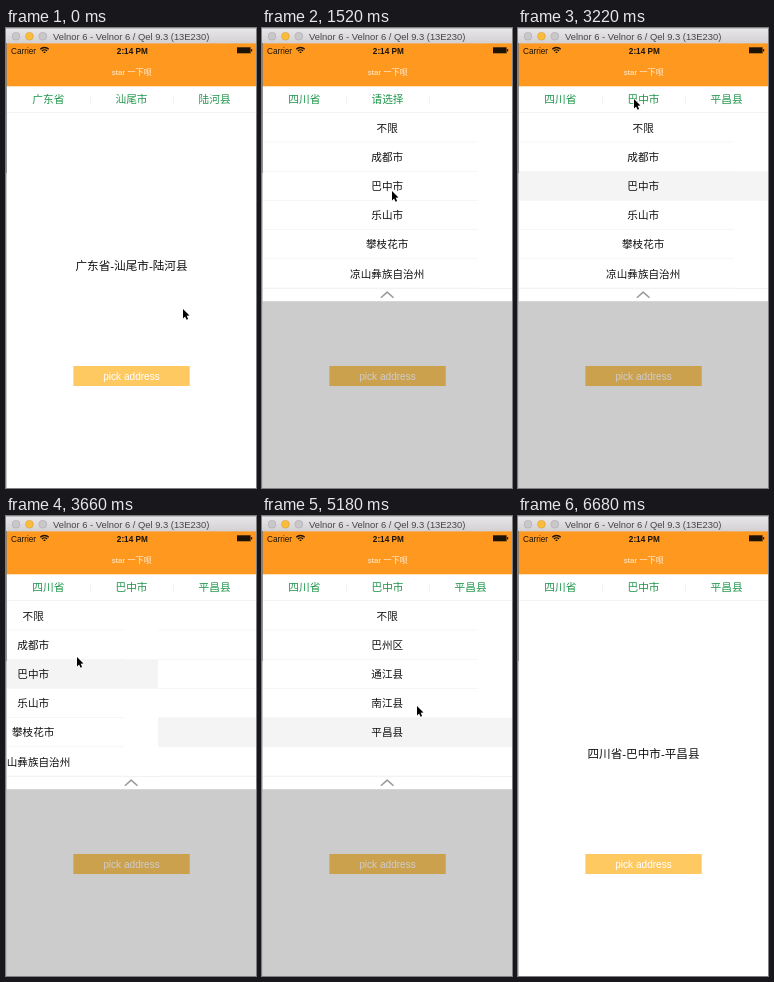
These frames come from a looping animation (250 by 460 pixels, 6.7 s). An HTML page with a canvas:

```html
<!DOCTYPE html>
<html lang="zh-CN">
<head>
<meta charset="utf-8">
<title>Address picker</title>
<style>
html, body { margin: 0; width: 100%; height: 100%; overflow: hidden; background: #fff; }
canvas { display: block; width: 250px; height: 460px; }
</style>
</head>
<body>
<canvas id="stage"></canvas>
<script>
const W = 250, H = 460, LOOP = 6700, MID = 125.2;
const TOP = 85, ROW = 29.2, LIST_H = ROW * 6, BAR_H = 13;
const INK = '#1c1208';
const FONT = '"Liberation Sans", "Noto Sans CJK SC", "Noto Sans CJK", sans-serif';

const canvas = document.getElementById('stage');
const ctx = canvas.getContext('2d');
const dpr = window.devicePixelRatio || 1;
canvas.width = W * dpr;
canvas.height = H * dpr;

const provinces = ['湖南省', '广东省', '广西壮族自治区', '海南省', '重庆市', '四川省', '贵州省', '云南省', '西藏自治区'];
const cities = ['不限', '成都市', '巴中市', '乐山市', '攀枝花市', '凉山彝族自治州'];
const counties = ['不限', '巴州区', '通江县', '南江县', '平昌县'];

// Moments of each action; the lists stand side by side as three pages
const OPEN = 680, PICK_PROVINCE = 1240, PICK_CITY = 1620, PICK_COUNTY = 2060;
const REOPEN = 2735, SWIPE = 3614, SWIPE_BACK = 3960;
const TAP_PROVINCE = 4622, TAP_CITY = 4820, TAP_COUNTY = 5000, CLOSE = 5660;

const tabX = i => 42.4 + i * 83.1;
const tab = i => [tabX(i) + 7, 70];
const row = i => [130, TOP + (i + .6) * ROW];

// The pointer reaches each place at the given time and waits there
const stops = [
  [0, 177, 281], [OPEN - 60, ...tab(0)], [PICK_PROVINCE - 40, ...row(2.5)], [1500, 130, 163],
  [PICK_COUNTY - 60, ...row(4)], [REOPEN - 40, 116, 71], [SWIPE - 20, 166, 141], [SWIPE + 46, 71, 141],
  [SWIPE_BACK + 120, 166, 141], [TAP_PROVINCE - 20, 49, 69], [TAP_CITY - 20, ...tab(1)],
  [TAP_COUNTY - 20, ...tab(2)], [5180, 155, 190], [CLOSE - 60, ...row(4)], [6560, 160, 475]
];

function ramp(t, start, span = 110) {
  const u = Math.min(1, Math.max(0, (t - start) / span));
  return u * u * (3 - 2 * u);
}

const openness = t => ramp(t, OPEN) - ramp(t, PICK_COUNTY) + ramp(t, REOPEN) - ramp(t, CLOSE);

const pageAt = t => ramp(t, PICK_PROVINCE) + ramp(t, PICK_CITY) - (t > 2400 ? 1 : 0)
  + ramp(t, SWIPE) - ramp(t, SWIPE_BACK) - ramp(t, TAP_PROVINCE) + ramp(t, TAP_CITY) + ramp(t, TAP_COUNTY);

function pointerAt(t) {
  const i = stops.findIndex(s => s[0] > t);
  if (i < 0) return stops[stops.length - 1].slice(1);
  const [t0, x0, y0] = stops[i - 1], [t1, x1, y1] = stops[i];
  const span = Math.min(t1 - t0, 360), u = ramp(t, t1 - span, span);
  return [x0 + (x1 - x0) * u, y0 + (y1 - y0) * u];
}

function rect(x, y, w, h, color) {
  ctx.fillStyle = color;
  ctx.fillRect(x, y, w, h);
}

function text(s, x, cy, size, color, align = 'center', weight = 400) {
  ctx.font = `${weight} ${size}px ${FONT}`;
  ctx.textAlign = align;
  ctx.fillStyle = color;
  ctx.fillText(s, x, cy + size * .37);
}

function clipped(x, y, w, h, draw) {
  ctx.save();
  ctx.beginPath();
  ctx.rect(x, y, w, h);
  ctx.clip();
  draw();
  ctx.restore();
}

function titleBar() {
  const g = ctx.createLinearGradient(0, 0, 0, 15);
  g.addColorStop(0, '#e9e7e9');
  g.addColorStop(1, '#d3d1d3');
  rect(0, 0, W, 15.4, g);
  rect(0, 0, W, .7, '#b0b0b0');
  for (let i = 0; i < 3; i++) {
    ctx.beginPath();
    ctx.arc(10 + i * 13.4, 8.2, 4, 0, 7);
    ctx.fillStyle = i === 1 ? '#f8bd3c' : '#c9c7c9';
    ctx.fill();
    ctx.lineWidth = .5;
    ctx.strokeStyle = 'rgba(0,0,0,.18)';
    ctx.stroke();
  }
  text('Velnor 6 - Velnor 6 / Qel 9.3 (13E230)', 47, 8.4, 9.4, '#464646', 'left');
}

function header() {
  rect(0, 15, W, 43.3, '#ff981f');
  text('Carrier', 5, 22.5, 8.2, INK, 'left');
  text('2:14 PM', 126.3, 22.5, 8.2, INK, 'center', 700);
  ctx.strokeStyle = INK;
  ctx.lineWidth = 1.3;
  for (const r of [1.2, 3.6, 6]) {
    ctx.beginPath();
    ctx.arc(38.5, 25.5, r, -Math.PI * .75, -Math.PI * .25);
    ctx.stroke();
  }
  rect(231, 19.3, 13.6, 6, INK);
  rect(245, 21.2, 1.2, 2.2, INK);
  text('star 一下呗', 125.8, 44.5, 8.1, '#fff0dc');
}

function tabs(t) {
  const names = t < PICK_PROVINCE ? ['广东省', '汕尾市', '陆河县'] :
    ['四川省', t < PICK_CITY ? '请选择' : '巴中市',
      t < PICK_CITY ? '' : t < PICK_COUNTY ? '请选择' : '平昌县'];
  rect(0, 58, W, 27, '#fff');
  names.forEach((s, i) => text(s, tabX(i), 71.5, 10.7, '#1f964b'));
  for (const x of [84, 167]) rect(x, 67, .6, 10, '#ececec');
  rect(0, 84.4, W, .6, '#ebebeb');
}

function list(names, left, picked, scroll = 0) {
  const x = Math.round(left);
  if (Math.abs(x) >= W) return;
  rect(x, TOP, W, LIST_H, '#fff');
  for (let i = 0; i < Math.max(6, names.length); i++) {
    const y = TOP + i * ROW - scroll;
    if (i === picked) rect(x, y, W, ROW, '#f4f4f4');
    else rect(x, y + ROW - .5, 216, .6, '#f0f0f0');
    if (names[i]) text(names[i], x + MID, y + ROW / 2, 10.6, '#111');
  }
}

function panel(t, p) {
  const page = pageAt(t), end = TOP + LIST_H * p, bar = BAR_H * p;
  rect(0, TOP, W, H - TOP, `rgba(0,0,0,${.2 * p ** 1.4})`);
  clipped(0, TOP, W, end - TOP, () => {
    list(provinces, -page * W, t < PICK_PROVINCE ? 1 : 5, 2.5 * ROW * ramp(t, 880, 200));
    list(cities, (1 - page) * W, t < PICK_CITY ? -1 : 2);
    list(counties, (2 - page) * W, t < PICK_COUNTY ? -1 : 4);
  });
  rect(0, end, W, bar, '#fff');
  rect(0, end - .3, W, .5, '#eee');
  clipped(0, end, W, bar, () => {
    const peak = end + bar * .3;
    ctx.strokeStyle = '#999';
    ctx.lineWidth = 1.5;
    ctx.beginPath();
    ctx.moveTo(MID - 6.3, peak + 5.7);
    ctx.lineTo(MID, peak);
    ctx.lineTo(MID + 6.3, peak + 5.7);
    ctx.stroke();
  });
}

function pointer(x, y) {
  const shape = [[0, 0], [0, 9.4], [2.1, 7.5], [3.6, 10.8], [5.1, 10.1], [3.7, 6.8], [6.5, 6.6]];
  ctx.beginPath();
  shape.forEach(([dx, dy]) => ctx.lineTo(x + dx, y + dy));
  ctx.closePath();
  ctx.lineJoin = 'round';
  ctx.lineWidth = 1.3;
  ctx.strokeStyle = '#fff';
  ctx.stroke();
  ctx.fillStyle = '#000';
  ctx.fill();
}

function draw(t) {
  ctx.setTransform(dpr, 0, 0, dpr, 0, 0);
  rect(0, 0, W, H, '#fff');
  text(t < PICK_COUNTY ? '广东省-汕尾市-陆河县' : '四川省-巴中市-平昌县', MID + .3, 237.5, 11.6, '#111');
  rect(67.4, 338, 116.3, 20, '#ffc961');
  text('pick address', 125.5, 348.2, 10.1, '#fff');

  const p = openness(t);
  if (p > 0) panel(t, p);
  tabs(t);
  header();
  titleBar();
  rect(0, 15, .8, 130, '#777');
  rect(0, 145, .8, H - 145, '#bbb');
  pointer(...pointerAt(t));
}

function tick() {
  draw(performance.now() % LOOP);
  requestAnimationFrame(tick);
}
tick();
</script>
</body>
</html>
```
